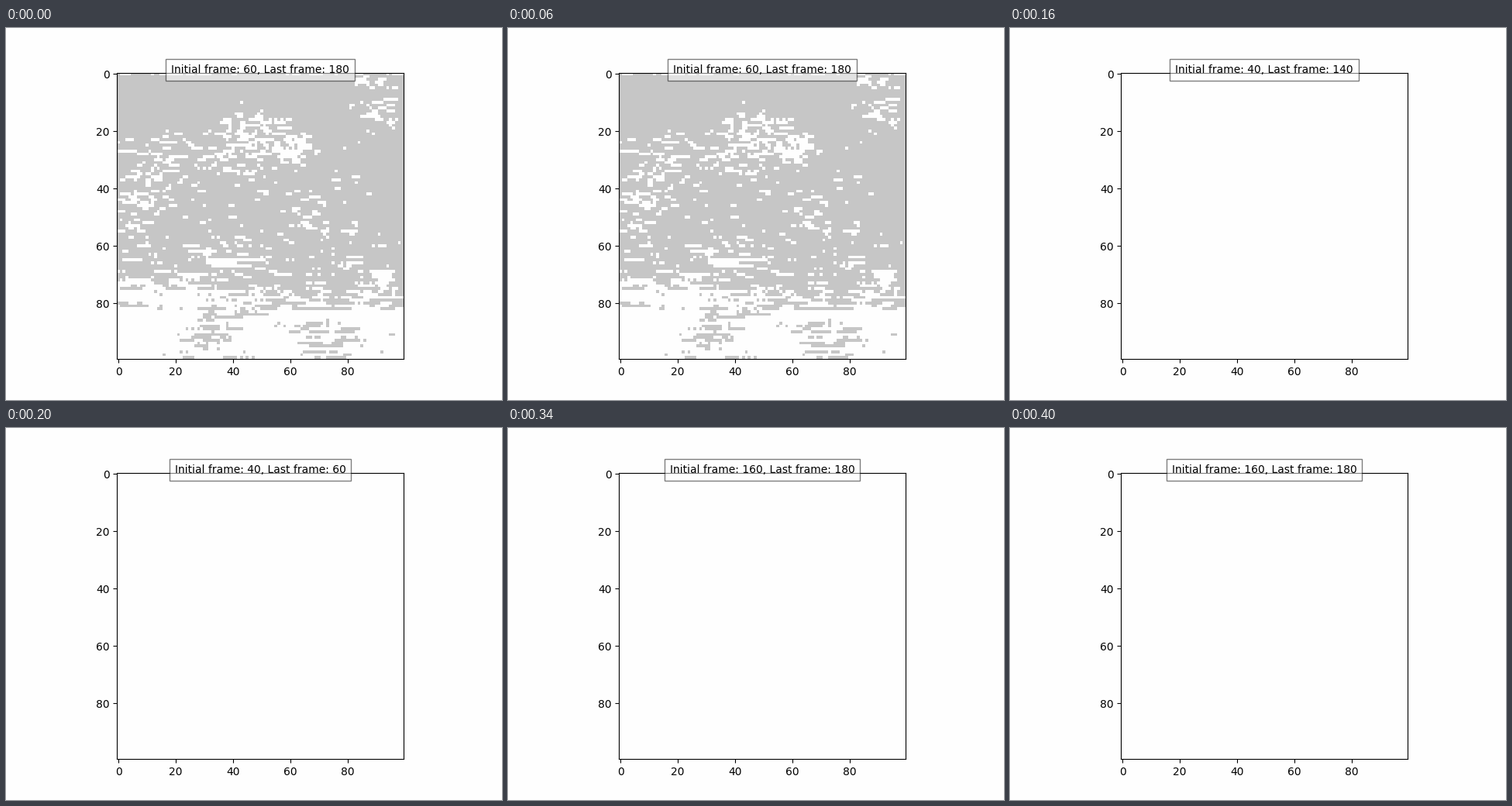
A matplotlib script that plays this animation: 640 px wide and 480 px high, repeating every 0.44 s.

```python
import numpy as np
import matplotlib.pyplot as plt
from matplotlib.animation import FuncAnimation

N = 100
STEP_MS = 20
GRAY, WHITE = 198, 254
PAPER = "#fefefe"

# start of each state in ms, with its first and last index
STATES = [(0, 60, 180), (100, 40, 140), (200, 40, 60), (240, 60, 100), (340, 160, 180)]

# soft spots that add (or take) white: centre x, y, half width, height, amount
SPOTS = [
    (87, 2, 7, 1.6, .7), (90, 12, 8, 7, .28),
    (47, 25, 13, 10, .42), (40, 18, 5, 4, .3), (63, 26, 5, 5, .5),
    (13, 33, 15, 11, .32), (6, 50, 7, 8, .33), (67, 49, 7, 7, .27),
    (32, 65, 19, 6, .27), (92, 71, 4, 3, .8),
    (50, 80.5, 60, 2.5, -.3), (30, 93, 9, 5, -.5), (40, 84, 9, 3, -.3),
    (75, 93, 13, 8, -.25),
]


def streaks(rng, width):
    """Noise stretched along the rows, ranked to 0..1."""
    raw = rng.normal(size=(N, N + width - 1))
    kernel = np.ones(width)
    rows = np.array([np.convolve(r, kernel, "valid") for r in raw])
    return rows.ravel().argsort().argsort().reshape(N, N) / N**2


def rise(t):
    return 1 / (1 + np.exp(-t))


def make_mask():
    rng = np.random.default_rng(7)
    y, x = np.mgrid[:N, :N]

    # white takes over downwards: later on odd rows and towards the right
    edge = 73.5 + .03 * x + 2 * (y % 2)
    share = .025 * rise(y - 19) + .1 * rise((y - 58) / 2) + .85 * rise((y - edge) / 1.1)
    share[0] += .35
    for cx, cy, rx, ry, amount in SPOTS:
        r2 = ((x - cx) / rx) ** 2 + ((y - cy) / ry) ** 2
        share += amount * np.exp(-.7 * r2 ** 2)

    # streaks grow longer towards the bottom
    noise = np.where(y < 60, streaks(rng, 3), streaks(rng, 6))
    return np.where(noise < share, WHITE, GRAY)


mask = make_mask()
blank = np.full((N, N), WHITE)

fig, ax = plt.subplots(figsize=(6.4, 4.8), dpi=100, facecolor=PAPER)
image = ax.imshow(mask, cmap="gray", vmin=0, vmax=255, interpolation="nearest")
label = ax.text(.5, 1, "", transform=ax.transAxes, ha="center",
                bbox={"facecolor": PAPER, "alpha": .5, "pad": 5})


def update(i):
    start, first, last = [s for s in STATES if s[0] <= i * STEP_MS][-1]
    image.set_data(mask if start == 0 else blank)
    label.set_text(f"Initial frame: {first}, Last frame: {last}")
    return image, label


anim = FuncAnimation(fig, update, frames=22, interval=STEP_MS,
                     repeat=True, repeat_delay=0, blit=False)
plt.show()
```
